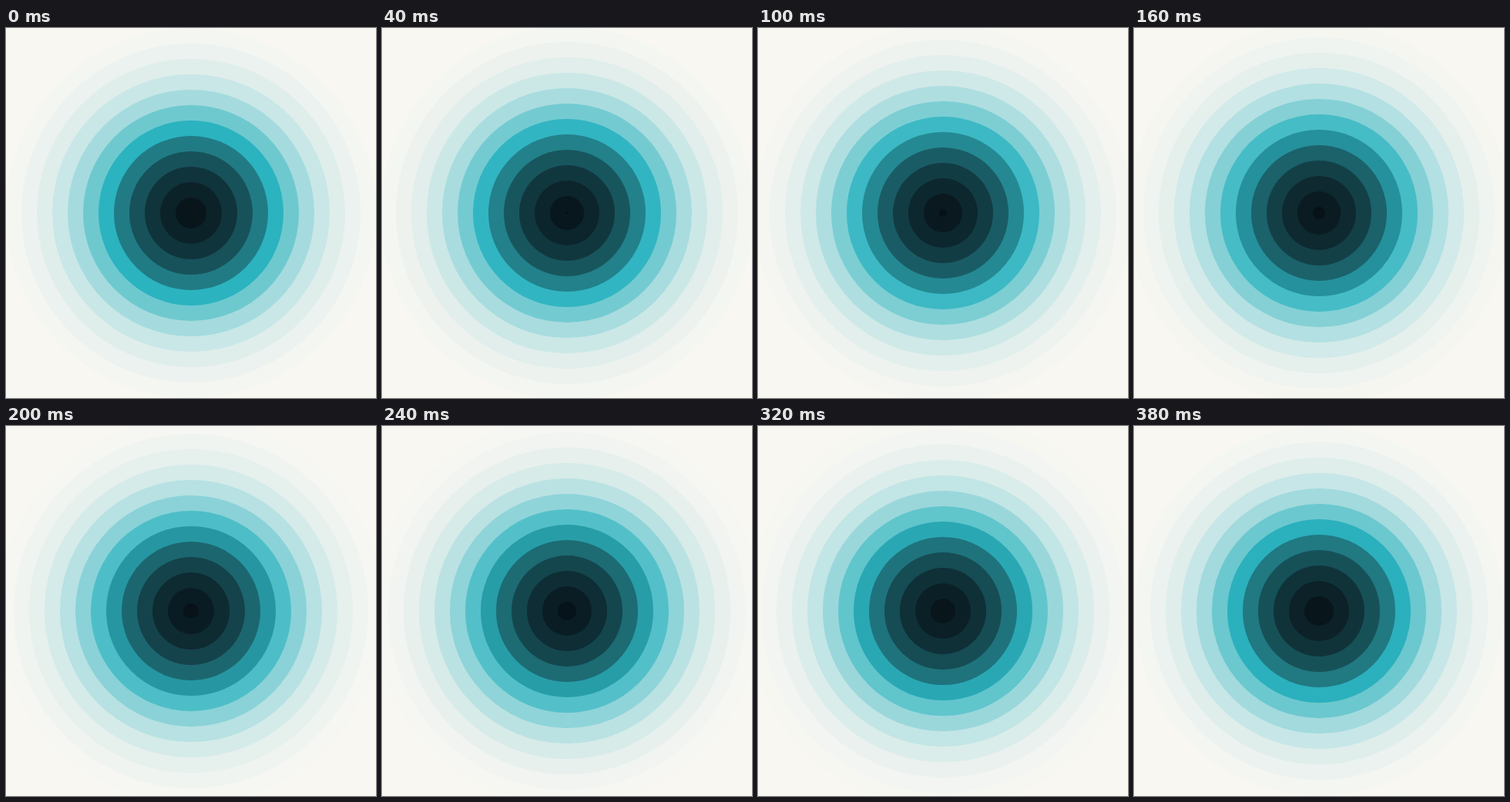
An HTML page with a canvas that plays this animation: 480x480 px, repeating every 0.4 s.

```html
<!DOCTYPE html>
<html lang="en">
<head>
<meta charset="utf-8">
<title>Expanding rings</title>
<style>
  html, body { margin: 0; width: 100%; height: 100%; overflow: hidden; background: #f8f7f2; }
  canvas { display: block; width: 480px; height: 480px; }
</style>
</head>
<body>
<canvas id="stage" width="480" height="480"></canvas>
<script>
const LOOP = 400, STEPS = 20, GAP = 20, CENTER = 240;
const ctx = document.getElementById('stage').getContext('2d');

// Ring colour at radius 0, 20, 40, ...
const ramp = [
  '060f16', '08161c', '0c2229', '10343b', '17525a', '217b84', '2bb3c0',
  '6ec9cf', 'a5dbde', 'c9e7e7', 'e0eeeb', 'ecf2ef', 'f4f6f1', 'f8f7f2'
].map(hex => [0, 2, 4].map(i => parseInt(hex.slice(i, i + 2), 16)));

function colorAt(radius) {
  const pos = Math.min(radius / GAP, ramp.length - 1);
  const i = Math.min(Math.floor(pos), ramp.length - 2);
  const mix = ramp[i].map((v, c) => Math.round(v + (ramp[i + 1][c] - v) * (pos - i)));
  return `rgb(${mix})`;
}

function draw(time) {
  const step = Math.floor((time % LOOP) / LOOP * STEPS + 1e-6) % STEPS;
  const grow = step * GAP / STEPS;
  ctx.fillStyle = colorAt(Infinity);
  ctx.fillRect(0, 0, 480, 480);
  for (let k = 12; k >= 0; k--) {
    const radius = k * GAP + grow;
    ctx.fillStyle = colorAt(radius);
    ctx.beginPath();
    ctx.arc(CENTER, CENTER, radius, 0, Math.PI * 2);
    ctx.fill();
  }
}

const start = performance.now();
function tick() {
  draw(performance.now() - start);
  requestAnimationFrame(tick);
}
tick();
</script>
</body>
</html>
```
